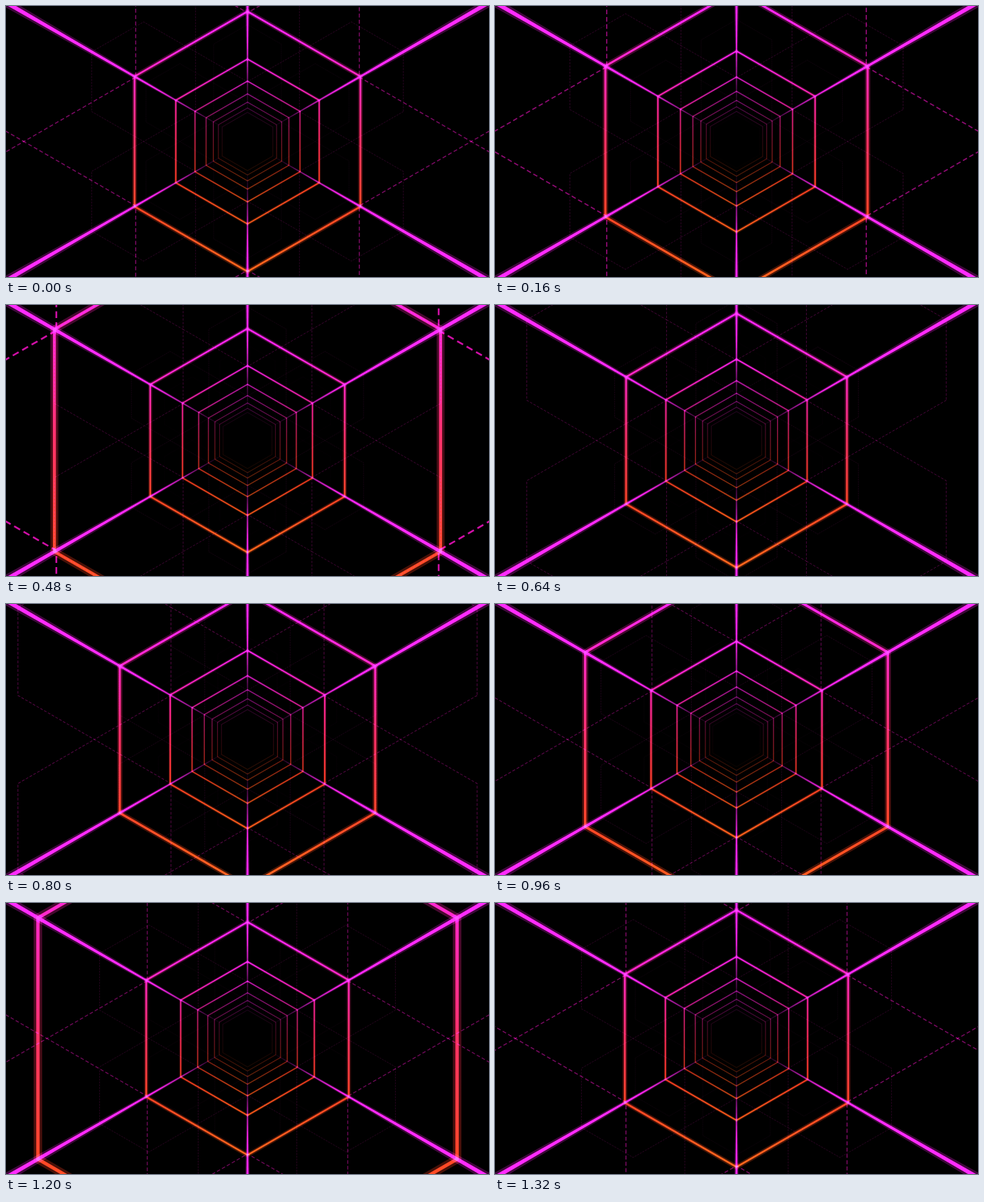
Write an HTML page with a canvas that moves like this. It is 700 by 394 pixels and loops after 1360 ms.

```html
<!DOCTYPE html>
<html lang="en">
<head>
<meta charset="utf-8">
<title>Hexagon tunnel</title>
<style>
html, body { margin: 0; width: 100%; height: 100%; overflow: hidden; background: #000; }
canvas { display: block; }
</style>
</head>
<body>
<canvas id="stage" width="700" height="394"></canvas>
<script>
const ctx = document.getElementById('stage').getContext('2d');
const W = 700, H = 394, CX = 350, CY = 197;
const LOOP = 1360, STEP = 40;
const SPEED = 1.5;    // rings per second
const FOCAL = 328;    // ring radius at depth 1
const START = 1.735;  // depth of the nearest ring at time 0
const TAPER = 0.016;  // line width per unit of radius
const FAR = 8.6;

const clamp = v => Math.max(0, Math.min(1, v));
const corner = (i, r) => {
  const a = Math.PI / 6 + i * Math.PI / 3;
  return [r * Math.cos(a), r * Math.sin(a)];
};

function hexPath(x, y, r) {
  ctx.beginPath();
  for (let i = 0; i < 6; i++) {
    const [dx, dy] = corner(i, r);
    ctx.lineTo(x + dx, y + dy);
  }
  ctx.closePath();
}

function stroke(width, alpha) {
  ctx.lineWidth = width;
  ctx.globalAlpha = alpha;
  ctx.stroke();
}

function ringColor(r) {
  const g = ctx.createLinearGradient(0, -r, 0, r);
  g.addColorStop(0, '#ff20e8');
  g.addColorStop(0.25, '#ff22a8');
  g.addColorStop(0.5, '#ff2a58');
  g.addColorStop(0.75, '#ff3c20');
  g.addColorStop(1, '#ff5a18');
  return g;
}

function drawRing(depth) {
  const r = FOCAL / depth, w = r * TAPER;
  const alpha = clamp((FAR - depth) / 6.6);
  ctx.strokeStyle = ringColor(r);
  hexPath(0, 0, r);
  stroke(w * 2.2, alpha * 0.28);
  stroke(Math.max(0.9, w * 0.85), alpha * 0.92);
}

// six dashed neighbours that touch the ring at its corners
function drawNeighbours(depth) {
  const r = FOCAL / depth * 0.99;
  ctx.strokeStyle = '#e010b4';
  ctx.setLineDash([10 / depth, 6 / depth]);
  for (let i = 0; i < 6; i++) {
    const [x, y] = corner(i, 2 * r);
    hexPath(x, y, r);
    stroke(Math.max(0.8, 2.6 / depth), clamp(0.95 / depth) * clamp((7.5 - depth) / 4));
  }
  ctx.setLineDash([]);
}

const rodColor = ctx.createRadialGradient(0, 0, 0, 0, 0, 480);
[[42, 0], [60, 0.16], [100, 0.55], [150, 0.8], [220, 1]].forEach(([r, a]) =>
  rodColor.addColorStop(r / 480, `rgba(255,36,240,${a})`));

function drawRods() {
  ctx.fillStyle = rodColor;
  for (const [scale, alpha] of [[2, 0.25], [0.9, 0.95]]) {
    ctx.globalAlpha = alpha;
    for (let i = 0; i < 6; i++) {
      const [x, y] = corner(i, 480);
      const k = TAPER * scale / 2;
      ctx.beginPath();
      ctx.moveTo(0, 0);
      ctx.lineTo(x - y * k, y + x * k);
      ctx.lineTo(x + y * k, y - x * k);
      ctx.fill();
    }
  }
}

function draw(ms) {
  const shift = SPEED * ms / 1000;
  ctx.setTransform(1, 0, 0, 1, 0, 0);
  ctx.globalAlpha = 1;
  ctx.globalCompositeOperation = 'source-over';
  ctx.fillStyle = '#000';
  ctx.fillRect(0, 0, W, H);
  ctx.translate(CX, CY);
  ctx.globalCompositeOperation = 'lighter';
  for (let i = 11; i >= 0; i--) {
    const depth = START + i - shift;
    if (depth < 0.5 || depth > FAR) continue;
    if (i % 2 === 0) drawNeighbours(depth);
    drawRing(depth);
  }
  drawRods();
}

const begin = performance.now();
function tick() {
  const t = (performance.now() - begin) % LOOP;
  draw(Math.floor(t / STEP) * STEP);
  requestAnimationFrame(tick);
}
tick();
</script>
</body>
</html>
```
